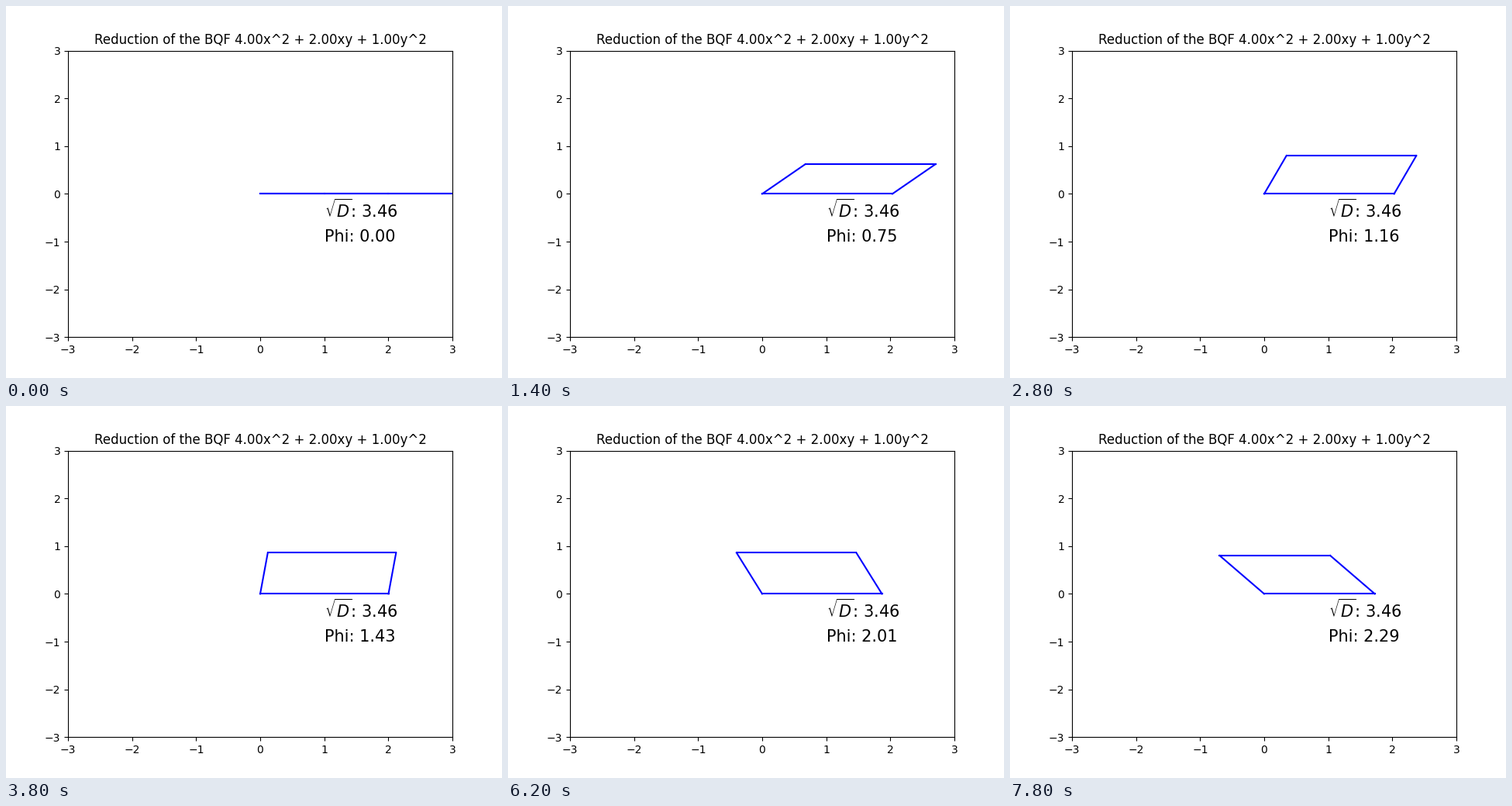
Recreate the animation shown at these times as a matplotlib script. Size 640 by 480 pixels, loop 8 s.

```python
import numpy as np
import matplotlib.pyplot as plt
from matplotlib.animation import FuncAnimation

A, B, C = 4.0, 2.0, 1.0   # form A x^2 + B xy + C y^2
FRAMES = 40
STEPS = 70                # frames for one full reduction step


def transformed(s):
    """Coefficients after two partial shears of size s."""
    p, q = 1 - s * s, s   # first basis vector
    r, t = -s, 1.0        # second basis vector
    a = A * p * p + B * p * q + C * q * q
    b = 2 * A * p * r + B * (p * t + q * r) + 2 * C * q * t
    c = A * r * r + B * r * t + C * t * t
    return a, b, c


fig, ax = plt.subplots(figsize=(6.4, 4.8), dpi=100)
ax.set_xlim(-3, 3)
ax.set_ylim(-3, 3)
ax.set_title(f"Reduction of the BQF {A:.2f}x^2 + {B:.2f}xy + {C:.2f}y^2")

sides = [ax.plot([], [], color="blue", lw=1.5)[0] for _ in range(4)]
root_text = ax.text(1, -0.5, "", fontsize=15)
phi_text = ax.text(1, -1, "", fontsize=15)


def update(i):
    a, b, c = transformed(i / STEPS)
    phi = np.arccos(np.clip(b / np.sqrt(a * c), -1, 1))
    o = np.zeros(2)
    u = np.array([np.sqrt(a), 0])
    v = np.sqrt(c) * np.array([np.cos(phi), np.sin(phi)])
    ends = [(o, u), (o, v), (u, u + v), (v, u + v)]
    for side, (start, end) in zip(sides, ends):
        side.set_data([start[0], end[0]], [start[1], end[1]])
    root = np.sqrt(4 * a * c - b * b)
    root_text.set_text(rf"$\sqrt{{D}}$: {root:.2f}")
    phi_text.set_text(f"Phi: {phi:.2f}")
    return [*sides, root_text, phi_text]


anim = FuncAnimation(fig, update, frames=FRAMES, interval=200,
                     repeat=True, repeat_delay=0, blit=False)
plt.show()
```
